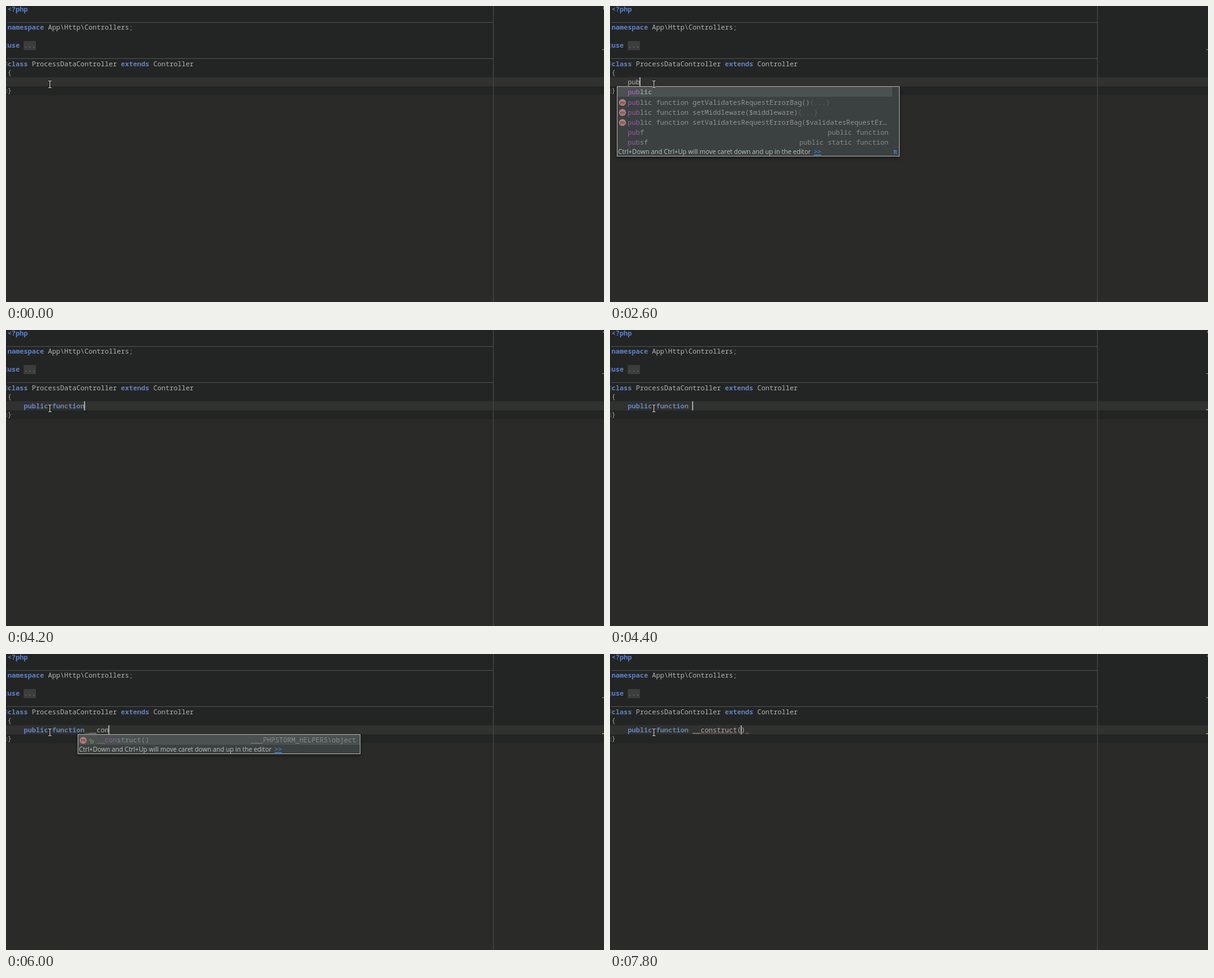
Recreate the animation shown at these times as an HTML page. Size 960x476 px, loop 8 s.

```html
<!DOCTYPE html>
<html lang="en">
<head>
<meta charset="utf-8">
<title>Typing a constructor</title>
<style>
  html, body { margin: 0; width: 100%; height: 100%; overflow: hidden; background: #2a2a28; }
  svg { display: block; }
  text { font: 10.833px "Noto Sans Mono", monospace; fill: #b1b5af; white-space: pre; }
  .kw { font-weight: 700; fill: #6482ba; }
  .brace { fill: #aaa48c; }
  .semi { fill: #6f8b9d; }
  .fold { fill: #8b8d78; }
  .item { fill: #8e9491; }
  .dim { fill: #858b88; }
  .match { fill: #91609a; }
  .faint { fill: #5c6261; }
  .bold { font-weight: 700; }
  .hint { font: 10.2px "Open Sans", sans-serif; fill: #bcc0bf; }
  .link { fill: #5b97d3; text-decoration: underline; }
  .icon { font: 8px "Open Sans", sans-serif; fill: #3a2d2d; text-anchor: middle; }
  .popup { filter: drop-shadow(0 3px 3px rgba(0, 0, 0, .4)); }
</style>
</head>
<body>
<svg width="960" height="476" viewBox="0 0 960 476"><g id="page"></g><g id="live"></g></svg>
<script>
const LOOP = 8000, CHAR = 6.5, LEFT = 2.5, ROW = 14.6;
const colX = col => LEFT + col * CHAR;
const baseline = row => 9 + row * ROW;

const rect = (x, y, w, h, fill, more = '') =>
  `<rect x="${x}" y="${y}" width="${w}" height="${h}" fill="${fill}" ${more}/>`;
const text = (x, y, body, cls = '', more = '') =>
  `<text x="${x}" y="${y}" class="${cls}" ${more}>${body}</text>`;
const span = (cls, body) => `<tspan class="${cls}">${body}</tspan>`;
const right = (x, y, body) => text(x, y, body, 'dim', 'text-anchor="end"');
const code = (row, body) => text(LEFT, baseline(row), body);

function squiggle(from, to) {
  let d = '';
  for (let col = from * 4; col <= to * 4; col++)
    d += `${d ? 'L' : 'M'}${colX(col / 4)} ${col % 2 ? 126.6 : 128.6}`;
  return `<path d="${d}" fill="none" stroke="#a5643f" stroke-width=".9"/>`;
}

const methodIcon = (x, y) =>
  `<circle cx="${x}" cy="${y}" r="5.6" fill="#b07c7a"/>` + text(x, y + 2.6, 'm', 'icon');

const lockIcon = (x, y) =>
  rect(x - 1, y, 4, 3.5, 'none', 'stroke="#71954f"') +
  `<path d="M${x - 3} ${y}v-2q1.5 -2 3 0v2" fill="none" stroke="#71954f"/>`;

function frame(x, height, selectedWidth) {
  return rect(x + .5, 129.5, 453, height, '#3b4040', 'class="popup"') +
    rect(x + 1, 130, selectedWidth, 16, '#4b5050') +
    rect(x + .5, 129.5, 453, height, 'none', 'stroke="#a9adab"');
}

const hint = (x, y, body) => text(x, y, `${body}<tspan class="link" dx="5">&gt;&gt;</tspan>`, 'hint');
const CARET_HINT = 'Ctrl+Down and Ctrl+Up will move caret down and up in the editor';

function matched(body, count, tail = '') {
  return span('match', body.slice(0, count)) + body.slice(count) + span('faint', tail);
}

function keywordPopup(typed) {
  const count = typed.trim().length;
  const rowY = i => 142.3 + i * 16.2;
  const methods = [
    ['public function getValidatesRequestErrorBag()', '{...}'],
    ['public function setMiddleware($middleware)', '{...}'],
    ['public function setValidatesRequestErrorBag($validatesRequestEr…']
  ];
  const templates = [['pubf', 'public function'], ['pubsf', 'public static function']];
  return frame(11, 112, 441) +
    text(28.5, rowY(0), matched('public', count), 'item bold') +
    methods.map(([body, tail], i) => methodIcon(20, rowY(i + 1) - 3.5) +
      text(28.5, rowY(i + 1), matched(body, count, tail), 'item')).join('') +
    templates.map(([body, type], i) => text(28.5, rowY(i + 4), matched(body, count), 'item') +
      right(447, rowY(i + 4), type)).join('') +
    hint(13, 238, CARET_HINT) + text(454.5, 238, 'π', '', 'style="fill:#5b97d3"');
}

function methodPopup(body, type, message) {
  return typed => frame(115, 31, 452) + methodIcon(124, 138.8) + lockIcon(137, 139.5) +
    text(145.5, 142.3, matched(body, typed.length - 20), 'dim') +
    right(562, 142.3, type) + hint(117, 157, message);
}
const callPopup = methodPopup('__call(method : string, parameters : array)', 'mixed',
  'Invoke completion again to see more variants.');
const constructPopup = methodPopup('__construct()', '___PHPSTORM_HELPERS\\object', CARET_HINT);

const PAD = '    ', FN = PAD + 'public function ', GAP = [[19, 20]];
// Each step: start time, typed line, then what differs from the defaults.
const steps = [
  [0, PAD, { caret: false, status: 'bar' }],
  [200, PAD, { status: 'bar' }],
  [1000, PAD, { caret: false, status: 'bar' }],
  [1400, PAD + 'p'],
  [1600, PAD + 'pu'],
  [1800, PAD + 'pu', { popup: keywordPopup }],
  [2600, PAD + 'pub', { popup: keywordPopup }],
  [3400, PAD + 'public ', { status: 'dot' }],
  [3600, PAD + 'public f', { status: 'dot' }],
  [3800, PAD + 'public fun', { status: 'dot' }],
  [4000, PAD + 'public funct', { status: 'dot' }],
  [4200, PAD + 'public function', { status: 'dot' }],
  [4400, FN, { status: 'dot', warn: true }],
  [4800, FN, { caret: false, warn: true, waves: GAP }],
  [5200, FN + '_', { warn: true, waves: GAP }],
  [5400, FN + '__', { warn: true, waves: GAP }],
  [5600, FN + '__', { warn: true, waves: GAP, popup: callPopup }],
  [5800, FN + '__co', { warn: true, waves: GAP, popup: constructPopup }],
  [6000, FN + '__con', { warn: true, waves: GAP, popup: constructPopup }],
  [6200, FN + '__const', { warn: true, waves: GAP, popup: constructPopup }],
  [6400, FN + '__constr', { warn: true, waves: GAP, popup: constructPopup }],
  [6600, FN + '__constru', { warn: true, waves: GAP, popup: constructPopup }],
  [6800, FN + '__construct', { warn: true, waves: GAP, popup: constructPopup }],
  [7200, FN + '__construct', { warn: true, waves: GAP }],
  [7400, FN + '__construct(', { warn: true, after: ')', waves: GAP }],
  [7600, FN + '__construct(', { warn: true, after: ')', status: 'dot' }],
  [7800, FN + '__construct(', { warn: true, after: ')', status: 'dot', waves: [[20, 31], [33, 34]] }]
];

const pointer = ['stroke="#161616" stroke-width="2.6"', 'stroke="#d8d8d8" stroke-width="1.1"']
  .map(style => `<path d="M68 120.5h1.6l.9 .8l.9 -.8h1.6M70.5 121v10M68 131.5h1.6l.9 -.8l.9 .8h1.6" fill="none" ${style}/>`)
  .join('');

const status = {
  bar: rect(958.8, 0, 1.2, 6, '#8c8f8d'),
  dot: rect(958.5, 2, 1.5, 2.5, '#737773')
};

const kw = word => span('kw', word);
document.getElementById('page').innerHTML =
  rect(0, 0, 960, 143.7, '#232525') +
  rect(0, 114.5, 960, 14.7, '#313130') +
  rect(2, 26, 780, 1, '#4e4f4f') + rect(2, 84, 780, 1, '#4e4f4f') +
  rect(782, 0, 1, 476, '#4b4b4a') +
  [64, 93, 137].map(y => rect(-3.5, y - 3, 5, 6, 'none', 'stroke="#4c4f4f"')).join('') +
  rect(28.5, 56.3, 19.5, 14.6, '#3c3d3c') +
  code(0, kw('&lt;?php')) +
  code(2, kw('namespace') + ' App\\Http\\Controllers' + span('semi', ';')) +
  code(4, kw('use') + ' ' + span('fold', '...')) +
  code(6, kw('class') + ' ProcessDataController ' + kw('extends') + ' Controller') +
  code(7, span('brace', '{')) + code(9, span('brace', '}')) +
  rect(957, 69.5, 3, 1.3, '#8f8320');

const live = document.getElementById('live');

function draw([, typed, { caret = true, after = '', waves = [], popup, warn, status: mark } = {}]) {
  const line = (typed + after).replace(/\b(public|function)\b/g, kw('$1'));
  live.innerHTML = code(8, line) +
    waves.map(([from, to]) => squiggle(from, to)).join('') +
    (caret ? rect(colX(typed.length) - .6, 114.7, 1.4, 14.6, '#cdcfcd') : '') +
    (warn ? rect(957, 127.5, 3, 1.5, '#c9a72c') : '') +
    (status[mark] || '') +
    (popup ? popup(typed) : '') + pointer;
}

const start = performance.now();
let shown;
function tick() {
  const time = (performance.now() - start) % LOOP;
  const step = steps.findLast(([from]) => from <= time);
  if (step !== shown) draw(shown = step);
  requestAnimationFrame(tick);
}
tick();
</script>
</body>
</html>
```
